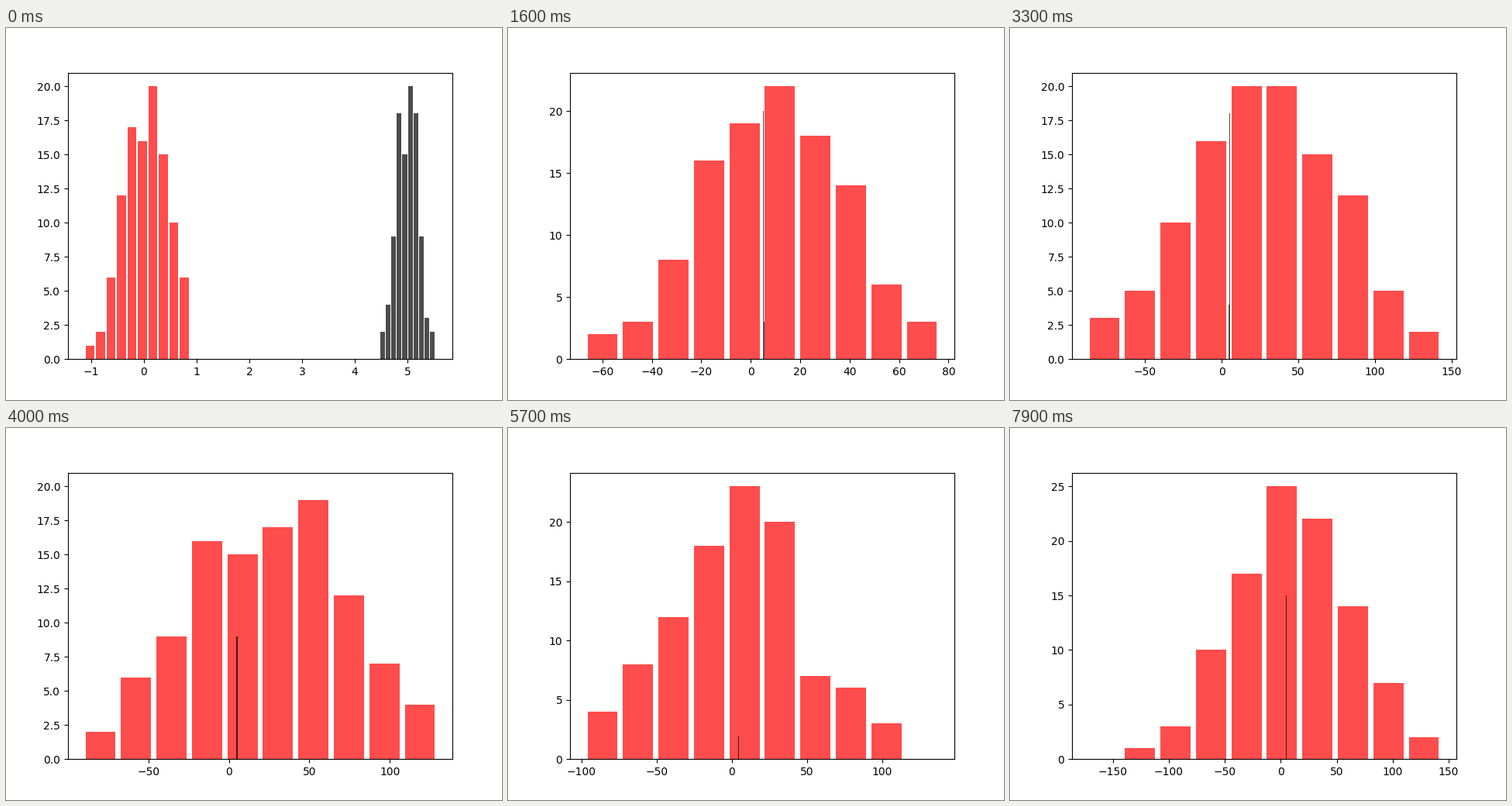
A matplotlib script for the animation above (8 s loop, 640 by 480 pixels).

```python
import matplotlib.pyplot as plt
import numpy as np
from matplotlib.animation import FuncAnimation

FRAMES, INTERVAL = 80, 100
BINS, RWIDTH = 10, 0.85
JITTER = 0.4

# step, left end, right end, highest count, bin of the mode, bell width in bins
KEYS = np.array([
    (0, -1.1096, 0.852, 20, 5.6, 2.2),
    (9, -35.128, 26.388, 20, 5.0, 2.2),
    (23, -96.971, 124.226, 23, 4.6, 1.9),
    (33, -86.376, 141.702, 20, 4.3, 2.2),
    (48, -92.099, 112.257, 18, 5.0, 2.6),
    (57, -96.105, 136.563, 23, 3.7, 2.0),
    (79, -171.0, 141.416, 25, 5.2, 1.7),
])
FIXED = [2, 4, 9, 18, 15, 20, 18, 9, 3, 2]


def bell_counts(peak, mode, width, rng):
    """Counts of a noisy bell curve whose tallest bin equals peak."""
    h = np.exp(-0.5 * ((np.arange(BINS) - mode) / width) ** 2) * peak
    h = np.maximum(h + JITTER * np.sqrt(h) * rng.normal(size=BINS), 0)
    return np.round(h * round(peak) / h.max())


def draw_hist(left, right, counts, color):
    pitch = (right - left) / (BINS - 1 + RWIDTH)
    ax.bar(left + pitch * np.arange(BINS), counts, width=RWIDTH * pitch,
           align="edge", color=color, alpha=0.7)


fig, ax = plt.subplots(figsize=(6.4, 4.8), dpi=100)


def update(i):
    ax.clear()
    left, right, *bell = (np.interp(i, KEYS[:, 0], c) for c in KEYS.T[1:])
    counts = bell_counts(*bell, np.random.RandomState(i))
    draw_hist(left, right, counts, "red")
    draw_hist(4.4816, 5.522, FIXED, "black")
    return ax.patches


anim = FuncAnimation(fig, update, frames=FRAMES, interval=INTERVAL,
                     repeat=True, repeat_delay=0)
plt.show()
```
